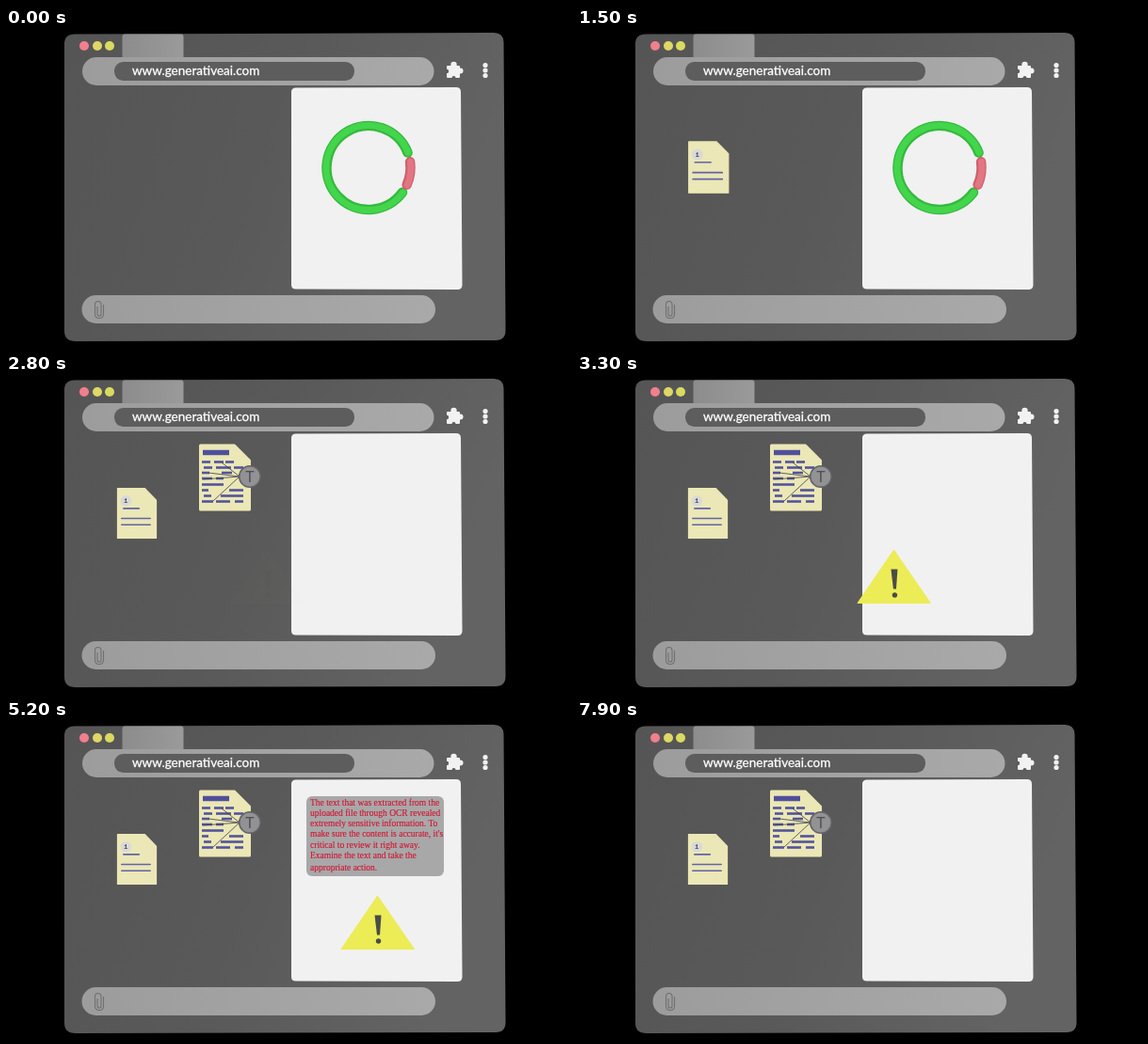
An HTML page that plays this animation: 600x338 px, repeating every 8 s.

```html
<!DOCTYPE html>
<html lang="en">
<head>
<meta charset="utf-8">
<title>Sensitive text warning</title>
<style>
  html, body { margin: 0; width: 100%; height: 100%; overflow: hidden; background: #000; }
  svg { display: block; width: 100vw; height: 100vh; }
  .paper { fill: #ebe7b6; stroke: #ebe7b6; stroke-width: 3; stroke-linejoin: round; }
  .rule { stroke: #6163a6; stroke-width: 4; stroke-linecap: round; }
  .url { font: 13.5px Lato, sans-serif; fill: #fff; stroke: #fff; stroke-width: .3; }
  .note { font: 9.5px "Liberation Serif", serif; fill: #d3132f; stroke: #d3132f; stroke-width: .12; }
  .info { font: 700 18px "Noto Sans Mono", monospace; fill: #55555a; text-anchor: middle; }
  .tee { font: 16px Inter, sans-serif; fill: #4e4e52; text-anchor: middle; }
</style>
</head>
<body>
<svg viewBox="0 0 600 338">
  <defs>
    <linearGradient id="win" x1="0" y1="0" x2="1" y2=".25">
      <stop offset="0" stop-color="#555"/><stop offset=".5" stop-color="#595959"/><stop offset="1" stop-color="#636363"/>
    </linearGradient>
    <linearGradient id="bar">
      <stop offset="0" stop-color="#9c9c9c"/><stop offset="1" stop-color="#a9a9a9"/>
    </linearGradient>
    <linearGradient id="tab">
      <stop offset="0" stop-color="#8c8c8c"/><stop offset="1" stop-color="#9a9a9a"/>
    </linearGradient>
  </defs>

  <path d="M62 17Q62 6.500 73 6.500L518 5Q528 5 528.500 15L530.500 321Q530.500 332 520 332L74 333Q62 333 62 322Z" fill="url(#win)"/>
  <circle cx="83" cy="19" r="5" fill="#f17f8e"/>
  <circle cx="97" cy="19" r="5" fill="#dfd766"/>
  <circle cx="110" cy="19" r="5" fill="#d9db60"/>
  <path d="M123.500 33V9Q123.500 6.500 126 6.500H186Q188.500 6.500 188.500 9V33Z" fill="url(#tab)"/>
  <rect x="81" y="31" width="373.500" height="30" rx="15" fill="url(#bar)"/>
  <rect x="115" y="36" width="255" height="20" rx="9.500" fill="#5d5d5d"/>
  <text class="url" x="134" y="50">www.generativeai.com</text>

  <g fill="#f2f2f2">
    <rect x="468" y="40" width="14" height="13" rx="1"/>
    <circle cx="475.500" cy="39" r="3.200"/>
    <circle cx="482.500" cy="45.500" r="3"/>
    <circle cx="509" cy="39.500" r="2.600"/>
    <circle cx="509" cy="45" r="2.600"/>
    <circle cx="509" cy="50.500" r="2.600"/>
  </g>
  <g fill="#5d5d5d">
    <circle cx="468" cy="46" r="2.200"/>
    <circle cx="475.500" cy="53" r="2"/>
  </g>

  <rect x="80.500" y="284" width="375.500" height="30" rx="15" fill="url(#bar)"/>
  <path d="M97 296V304Q97 306 99 306Q101 306 101 304V294Q101 290.500 97.500 290.500Q94.500 290.500 94.500 294V304Q94.500 308.500 99 308.500Q103.500 308.500 103.500 304V294" fill="none" stroke="#707070" stroke-width="1.100"/>

  <path d="M303 68Q303 63.500 308 63.500L478 63Q483 63 483 68L484.500 273Q484.500 278 479.500 278L308 277.500Q303 277.500 303 273Z" fill="#f1f1f2"/>

  <g id="ring" fill="none"></g>

  <g id="scan">
    <path class="paper" d="M206.500 76H242.500L258.500 92V144H206.500Z"/>
    <path d="M209 83.500H237" stroke="#4f509b" stroke-width="5.500"/>
    <g id="rows" stroke="#53549c" stroke-width="2.600"></g>
    <path d="M248 109L229 94M248 109L215 105M248 109L209 112M248 109L220 135" stroke="#3f3f45" stroke-width=".8"/>
    <circle cx="259" cy="109" r="11.300" fill="#929295" stroke="#626267" stroke-width="1.600"/>
    <text class="tee" x="259" y="115">T</text>
  </g>

  <g id="doc">
    <path class="paper" d="M131.500 85.500H201.500L231.500 116V214.500H131.500Z"/>
    <circle cx="153" cy="118" r="14" fill="#d9d9da"/>
    <text class="info" x="153" y="124">i</text>
    <path class="rule" d="M147 137.500H187M142 163.500H216M142 180H216"/>
    <path d="M140 194H196" stroke="#f0ecc0" stroke-width="1.500"/>
  </g>

  <g id="alert">
    <path d="M394.500 187L433.500 243.500H356Z" fill="#ecec57" stroke="#ecec57" stroke-linejoin="round"/>
    <path d="M391.500 207.500H398.500L397 228.500H394Z" fill="#4b4b48"/>
    <circle cx="395.500" cy="235" r="2.700" fill="#4b4b48"/>
  </g>

  <g id="message">
    <rect x="319" y="81" width="146" height="85" rx="6" fill="#a8a8a9"/>
  </g>
</svg>
<script>
  const LOOP = 8000;
  const $ = id => document.getElementById(id);
  const add = (parent, tag, attrs, text = '') => {
    const el = document.createElementNS('http://www.w3.org/2000/svg', tag);
    for (const k in attrs) el.setAttribute(k, attrs[k]);
    el.textContent = text;
    parent.append(el);
  };

  // Ring segments: shaded tube made of a dark and a lighter stroke
  const polar = (deg, r) => {
    const a = deg * Math.PI / 180;
    return `${385 + r * Math.cos(a)} ${148.5 + r * Math.sin(a)}`;
  };
  const arc = (from, to, dark, light) => {
    const large = to - from > 180 ? 1 : 0;
    for (const [r, width, color] of [[44.5, 10.5, dark], [45, 7, light]])
      add($('ring'), 'path', {
        d: `M${polar(from, r)}A${r} ${r} 0 ${large} 1 ${polar(to, r)}`,
        stroke: color, 'stroke-width': width, 'stroke-linecap': 'round'
      });
  };
  arc(36, 339, '#35b93d', '#43d54c');
  arc(-8, 24, '#cf616d', '#e27682');

  // Text rows on the scanned page: y, then pairs of start and end
  const rows = [
    [93.5, 208, 217, 221, 231, 233, 242],
    [99.5, 210, 219, 223, 239, 242, 252],
    [105, 208, 216, 229, 240],
    [111, 208, 219, 223, 231],
    [117.5, 208, 231],
    [123.5, 208, 215, 237, 252],
    [129.5, 210, 218, 228, 252],
    [135.5, 208, 220, 223, 238, 243, 252]
  ];
  for (const [y, ...xs] of rows)
    for (let i = 0; i < xs.length; i += 2)
      add($('rows'), 'path', { d: `M${xs[i]} ${y}H${xs[i + 1]}` });

  const lines = [
    'The text that was extracted from the',
    'uploaded file through OCR revealed',
    "extremely sensitive information. To",
    "make sure the content is accurate, it's",
    'critical to review it right away.',
    'Examine the text and take the',
    'appropriate action.'
  ];
  lines.forEach((s, i) => add($('message'), 'text',
    { class: 'note', x: 323, y: 90.5 + i * 11.3 + (i === 6 ? 1.7 : 0) }, s));

  const span = (t, a, b) => Math.min(1, Math.max(0, (t - a) / (b - a)));
  const ease = p => p < .5 ? 4 * p ** 3 : 1 - 4 * (1 - p) ** 3;
  const mix = (a, b, p) => a.map((v, i) => v + (b[i] - v) * p);
  const place = (el, [x, y, s], cx, cy) =>
    el.setAttribute('transform', `translate(${x} ${y}) scale(${s}) translate(${-cx} ${-cy})`);
  const fade = (el, o) => el.setAttribute('opacity', o);

  // Poses are x, y, scale
  const CLIP = [99, 294, 0], BIG = [181.5, 150, 1], SMALL = [139, 148, .41];
  const PAGE_START = [139, 148, .4], PAGE_END = [232.5, 110, 1];

  function draw(t) {
    place($('doc'), t < 1000
      ? mix(CLIP, BIG, ease(span(t, 0, 800)))
      : mix(BIG, SMALL, ease(span(t, 1000, 1600))), 181.5, 150);

    place($('scan'), mix(PAGE_START, PAGE_END, ease(span(t, 1500, 2270))), 232.5, 110);
    fade($('scan'), t < 1500 ? 0 : 1);

    fade($('ring'), 1 - span(t, 2500, 2800));

    const leave = 1 - span(t, 6700, 7300);
    const slide = ease(span(t, 2900, 3700));
    place($('alert'), [-117 * (1 - slide), 0, 1], 0, 0);
    fade($('alert'), span(t, 2800, 3100) * leave);
    fade($('message'), span(t, 4500, 5000) * leave);
  }

  const start = performance.now();
  function tick() {
    draw((performance.now() - start) % LOOP);
    requestAnimationFrame(tick);
  }
  draw(0);
  requestAnimationFrame(tick);
</script>
</body>
</html>
```
